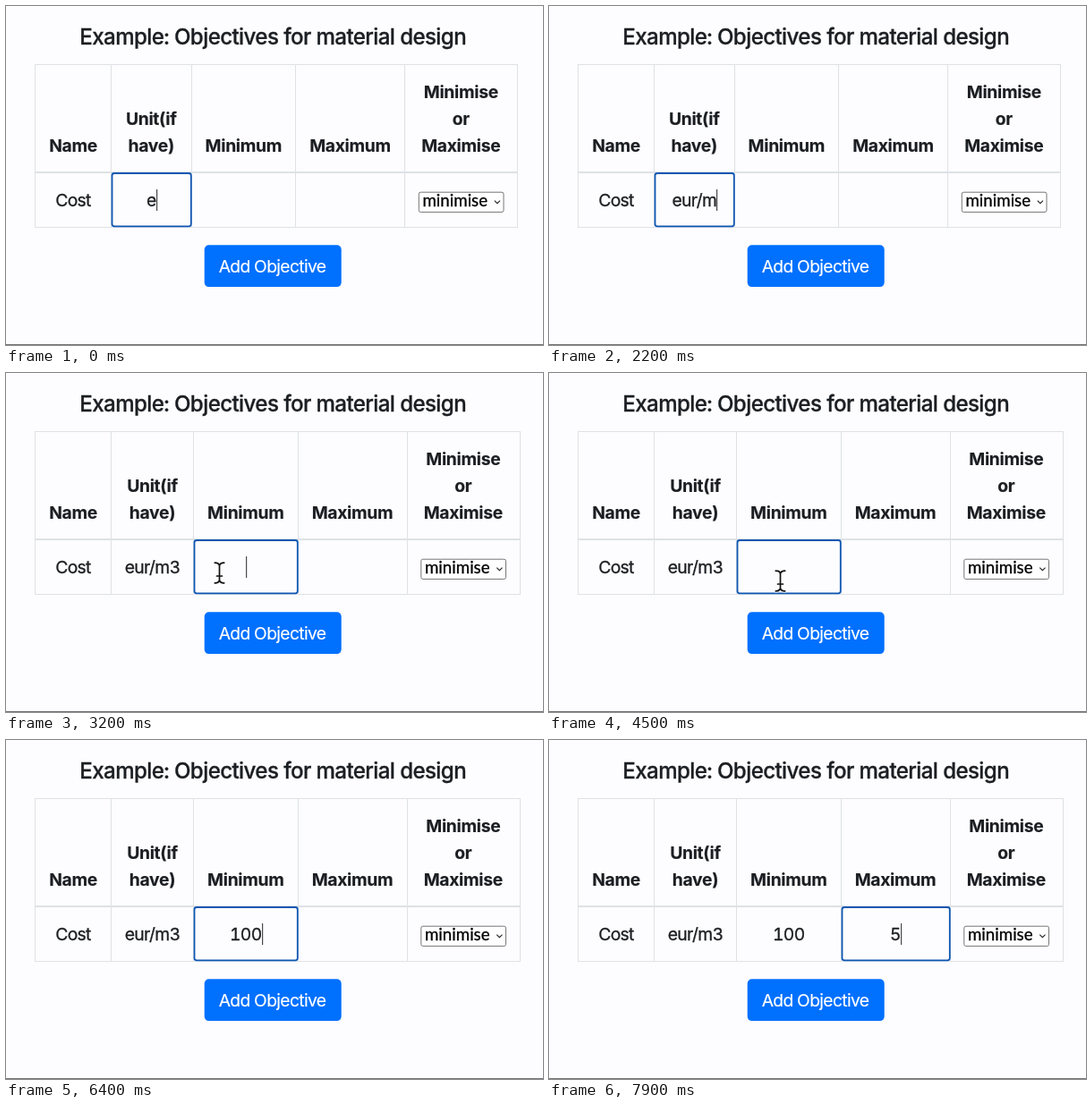
An HTML page for the animation above (8 s loop, 600 px wide and 379 px high).

```html
<!DOCTYPE html>
<html lang="en">
<head>
<meta charset="utf-8">
<title>Objectives table</title>
<style>
  html, body { margin: 0; width: 100%; height: 100%; overflow: hidden; background: #fdfcfe; }
  svg { display: block; width: 100%; height: 100%; }
  text { font: 19.3px Inter, sans-serif; font-optical-sizing: none; font-variant-numeric: tabular-nums;
         letter-spacing: -.034em; text-anchor: middle; white-space: pre;
         fill: #1b1e22; stroke: #1b1e22; stroke-width: .3px; }
  .title { font-size: 24.1px; font-weight: 500; letter-spacing: -.025em; }
  .head { font-weight: 700; letter-spacing: -.016em; stroke-width: .15px; }
  .label { fill: #fff; stroke: #fff; stroke-width: .2px; }
  .option { font: 18.7px Lato, sans-serif; letter-spacing: 0; text-anchor: start; fill: #000; stroke: #000; }
  .grid { fill: none; stroke: #dee2e6; }
  .ring { fill: none; stroke: #0f57b3; stroke-width: 1.8; }
  .caret { fill: #4a4a4a; }
  .beam { fill: none; stroke-linecap: round; }
</style>
</head>
<body>
<svg id="stage" viewBox="0 0 600 379"></svg>
<script>
const LOOP = 8000;
const BEAM = 'M-5.2-11.3Q-.6-11.3 0-8Q.6-11.3 5.2-11.3M0-8V8M-5.2 11.3Q-.6 11.3 0 8Q.6 11.3 5.2 11.3M-3 3.5H3';
const EDGES = [33.4, 118.4, 207.5, 324.2, 446.1, 572.1];
const CENTRES = [75, 162.3, 265.3, 384.5, 508.3];
const HEADS = [['Name'], ['Unit(if', 'have)'], ['Minimum'], ['Maximum'], ['Minimise', 'or', 'Maximise']];

// [start time, text] for each typed cell
const TYPED = {
  1: [[0, 'e'], [300, 'eu'], [600, 'eur'], [900, 'eur/'], [2000, 'eur/m'], [2500, 'eur/m3']],
  2: [[6000, '1'], [6300, '10'], [6400, '100']],
  3: [[7900, '5']]
};
const FOCUS = [[0, 1], [3000, 2], [6800, 3]];
const BLINK = [[0, 1], [1400, 0], [1900, 1], [3500, 0], [4000, 1], [4500, 0],
               [4900, 1], [5400, 0], [5900, 1], [7300, 0], [7800, 1]];
const POINTER = [[2700, 190, 228], [3000, 237, 224], [3200, 238.5, 223.5], [3300, 258.5, 232.5], [6000, 258.5, 232.5]];
const WIDE_AT = 2500;
const WIDEN = 2.5;

const stage = document.getElementById('stage');

function add(tag, attrs, parent = stage) {
  const el = document.createElementNS('http://www.w3.org/2000/svg', tag);
  set(el, attrs);
  return parent.appendChild(el);
}
function set(el, attrs) {
  for (const key in attrs) el.setAttribute(key, attrs[key]);
}
function label(str, x, y, cls = '') {
  const el = add('text', { x, y, class: cls });
  el.textContent = str;
  return el;
}
const latest = (steps, t, none) => steps.reduce((v, s) => t >= s[0] ? s[1] : v, none);

add('rect', { width: 600, height: 379, fill: '#fdfcfe' });
add('rect', { y: 378, width: 600, height: 1, fill: '#747474' });
label('Example: Objectives for material design', 298.2, 42.6, 'title');

const grid = add('path', { class: 'grid' });
const headRule = add('path', { class: 'grid', 'stroke-width': 2 });
const heads = HEADS.map(lines => lines.map((str, i) =>
  label(str, 0, 163.1 - 30 * (lines.length - 1 - i), 'head')));
const cells = CENTRES.slice(0, 4).map(() => label('', 0, 224.3));
cells[0].textContent = 'Cost';

const select = add('g', {});
add('rect', { x: 461.3, y: 208.2, width: 94.7, height: 22.2, rx: 2, fill: '#fff', stroke: '#767676' }, select);
select.append(label('minimise', 465.5, 224.4, 'option'));
add('path', { d: 'M545.8 217.6l3.1 3.1l3.1-3.1', fill: 'none', stroke: '#222', 'stroke-width': 1.1 }, select);

add('rect', { x: 221.7, y: 267.2, width: 153, height: 46.9, rx: 5, fill: '#0070ff' });
label('Add Objective', 297.5, 298.3, 'label');

const ring = add('rect', { class: 'ring', y: 187, height: 59.3, rx: 2.5 });
const caret = add('rect', { class: 'caret', y: 205, width: 1.2, height: 24 });
const pointer = add('g', { class: 'beam' });
add('path', { d: BEAM, stroke: '#fff', 'stroke-width': 3.6 }, pointer);
add('path', { d: BEAM, stroke: '#111', 'stroke-width': 1.7 }, pointer);

function pointerAt(t) {
  const i = POINTER.findIndex(p => p[0] > t);
  if (i < 1) return null;
  const [a, b] = [POINTER[i - 1], POINTER[i]];
  const k = (t - a[0]) / (b[0] - a[0]);
  return [1, 2].map(n => a[n] + (b[n] - a[n]) * k);
}

function draw(time) {
  const t = Math.floor(time % LOOP / 100) * 100;
  const grow = t >= WIDE_AT ? WIDEN : 0;
  const edges = EDGES.map((x, i) => Math.round(x + (i > 1 ? grow : 0)) - .5);
  const centres = CENTRES.map((x, i) => x + (i > 1 ? grow : i * grow / 2));
  const [left, right] = [edges[0], edges[5]];

  set(grid, { d: edges.map(x => `M${x} 65V248`).join('') + `M${left} 65.5H${right}M${left} 247.5H${right}` });
  set(headRule, { d: `M${left} 186H${right}` });
  heads.forEach((lines, i) => lines.forEach(el => set(el, { x: centres[i] })));
  cells.forEach((el, i) => {
    set(el, { x: centres[i] });
    if (TYPED[i]) el.textContent = latest(TYPED[i], t, '');
  });
  set(select, { transform: `translate(${grow})` });

  const col = latest(FOCUS, t);
  const width = cells[col].textContent ? cells[col].getComputedTextLength() : 0;
  set(ring, { x: edges[col] + 1, width: edges[col + 1] - edges[col] - 1.7 });
  set(caret, {
    x: Math.round(centres[col] + width / 2),
    visibility: latest(BLINK, t) ? 'visible' : 'hidden'
  });

  const at = pointerAt(t);
  set(pointer, at ? { transform: `translate(${at})`, visibility: 'visible' } : { visibility: 'hidden' });
}

const start = performance.now();
function tick() {
  draw(performance.now() - start);
  requestAnimationFrame(tick);
}
tick();
</script>
</body>
</html>
```
